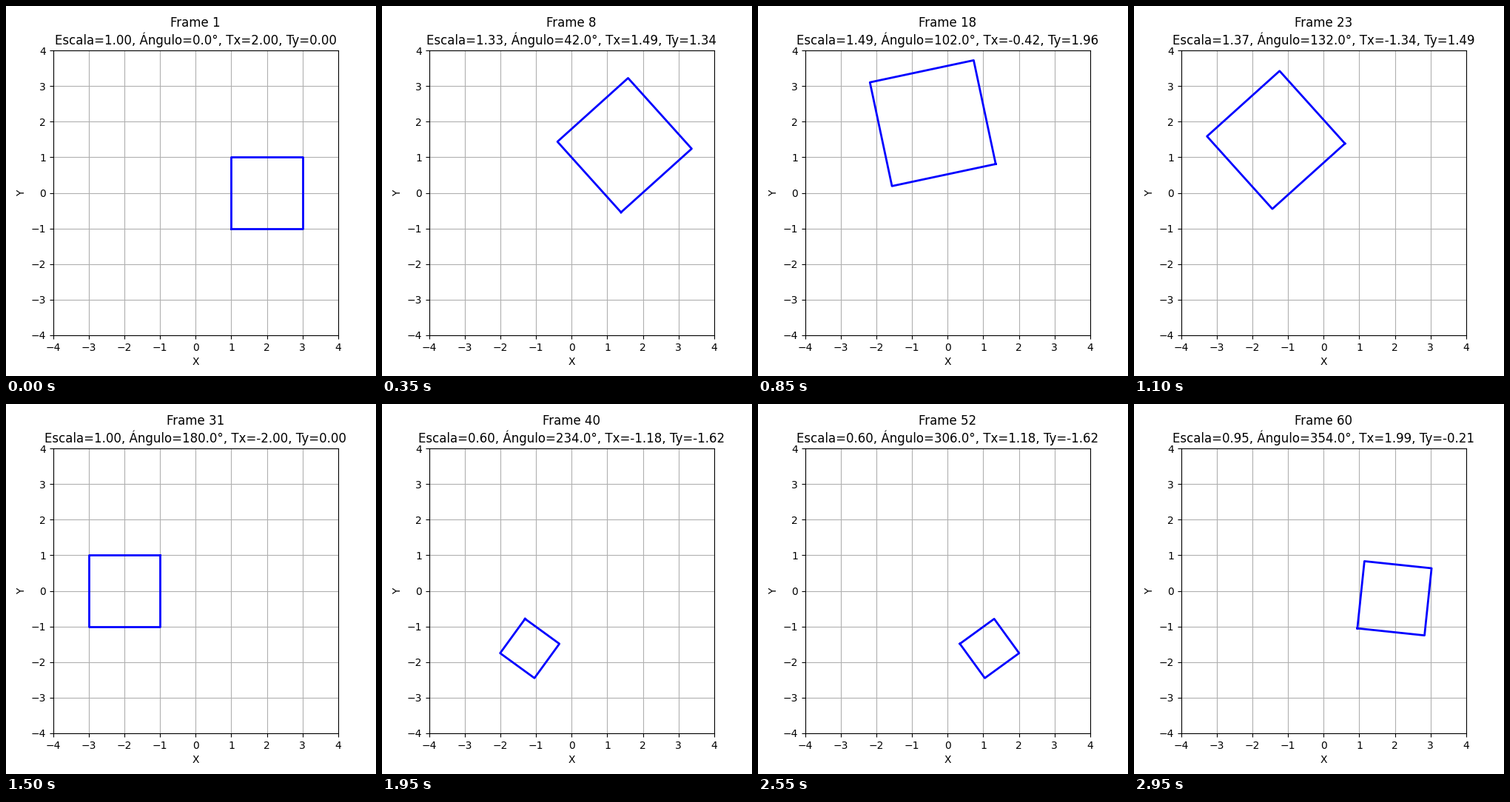
A matplotlib script that plays this animation: 500x500 px, repeating every 3 s.

```python
import numpy as np
import matplotlib.pyplot as plt
from matplotlib.animation import FuncAnimation

FRAMES = 60
INTERVAL = 50  # ms

# Closed unit square, one column per vertex
SQUARE = np.array([[-1, 1, 1, -1, -1],
                   [-1, -1, 1, 1, -1]])

fig, ax = plt.subplots(figsize=(5, 5), dpi=100)
ax.set_xlim(-4, 4)
ax.set_ylim(-4, 4)
ax.set_aspect("equal")
ax.set_xlabel("X")
ax.set_ylabel("Y")
ax.grid(True)
line, = ax.plot([], [], "b-", lw=2)
title = ax.set_title("")


def update(i):
    angle = 2 * np.pi * i / FRAMES
    c, s = np.cos(angle), np.sin(angle)
    scale = 1 + 0.5 * s
    tx, ty = 2 * c, 2 * s
    rotation = np.array([[c, -s], [s, c]])
    x, y = scale * rotation @ SQUARE + [[tx], [ty]]
    line.set_data(x, y)
    title.set_text(f"Frame {i + 1}\n"
                   f"Escala={scale:.2f}, Ángulo={np.degrees(angle):.1f}°, "
                   f"Tx={tx:.2f}, Ty={ty:.2f}")
    return line, title


anim = FuncAnimation(fig, update, frames=FRAMES, interval=INTERVAL,
                     repeat=True, repeat_delay=0, blit=False)
plt.show()
```
